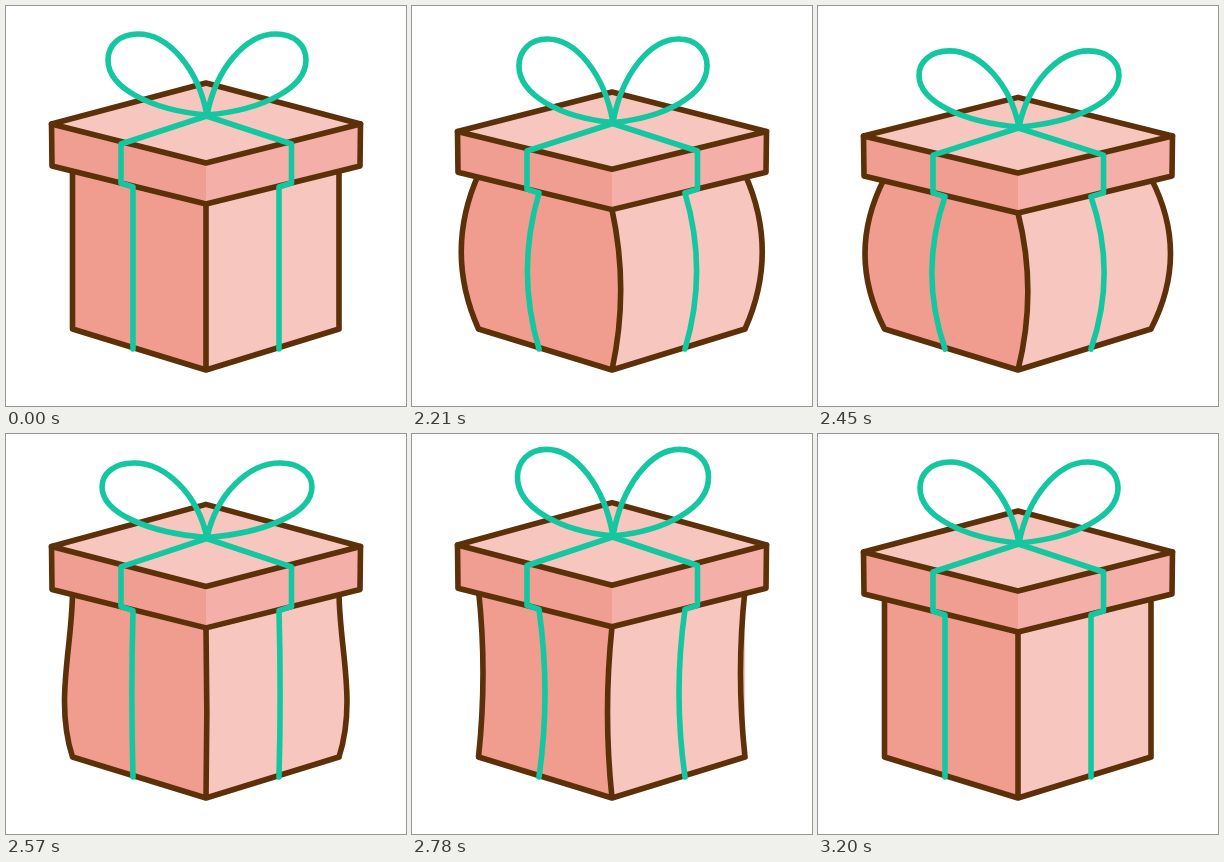
Recreate the animation shown at these times as an HTML page. Size 400 by 400 pixels, loop 3230 ms.

```html
<!DOCTYPE html>
<html>
<head>
<meta charset="utf-8">
<style>
  html, body { margin: 0; width: 100%; height: 100%; overflow: hidden; background: #fff; }
  svg { display: block; width: 100vw; height: 100vh; }
  .edge { stroke: #5c3008; }
  .ribbon { stroke: #15c7a0; fill: none; }
</style>
</head>
<body>
<svg viewBox="0 0 400 400" stroke-width="5.6" stroke-linejoin="round" stroke-linecap="round">
  <path id="bodyLeft" fill="#f09d8f"/>
  <path id="bodyRight" fill="#f7c6bf"/>
  <path id="bodyEdge" class="edge" fill="none"/>
  <path id="lidLeft" fill="#f09d92"/>
  <path id="lidRight" fill="#f4b0a8"/>
  <path id="lidEdge" class="edge" fill="none"/>
  <path id="lidTop" class="edge" fill="#f7c6bf"/>
  <path id="ribbons" class="ribbon"/>
  <path id="bow" class="ribbon"/>
</svg>
<script>
const LOOP = 3230, START = 2030, STEP = 30;

// time, lid drop, bow width, bow height, side bulge (upper, lower), inner bulge
const KEYS = [
  [2000, 0, 1, 1, 0, 0, 0],
  [2030, .7, .99, 1, 3, 3, 2],
  [2210, 7.5, .95, 1.03, 23, 23, 15.5],
  [2450, 12, 1.01, .94, 26, 26, 17.5],
  [2570, -5.5, 1.06, .92, 0, 18, 1.5],
  [2670, -19, 1, 1.07, -14, -8, -16],
  [2780, -7, .965, 1.07, -6, -6, -8],
  [2890, 5, .99, .99, 6, 5, 4],
  [3000, 2, 1.01, .98, 3, 3, 2],
  [3110, -1.5, 1, 1, -1, -1, -1],
  [3200, 0, 1, 1, 0, 0, 0],
  [3230, 0, 1, 1, 0, 0, 0]
];

const set = (id, d) => document.getElementById(id).setAttribute('d', d);

// Smooth spline through the keys
function pose(time) {
  if (time < START) return KEYS[0].slice(1);
  const t = START + Math.floor((time - START) / STEP) * STEP;
  let i = 0;
  while (i < KEYS.length - 2 && t >= KEYS[i + 1][0]) i++;
  const a = KEYS[i], b = KEYS[i + 1];
  const before = KEYS[i - 1] || a, after = KEYS[i + 2] || b;
  const span = b[0] - a[0], p = (t - a[0]) / span, q = 1 - p;
  return a.slice(1).map((v, k) => {
    const n = k + 1;
    const slopeA = (b[n] - before[n]) / (b[0] - before[0]) * span;
    const slopeB = (after[n] - a[n]) / (after[0] - a[0]) * span;
    return q * q * (1 + 2 * p) * v + p * p * (3 - 2 * p) * b[n] + p * q * (q * slopeA - p * slopeB);
  });
}

// Vertical edge bent sideways by its two control points
const bend = (x, top, bottom, upper, lower = upper) => {
  const third = (bottom - top) / 3;
  return `${x},${top} C${x + upper},${top + third} ${x + lower},${bottom - third} ${x},${bottom}`;
};

function draw(time) {
  const [drop, bowW, bowH, upper, lower, inner] = pose(time);
  const back = 77 + drop * 1.2, side = 118 + drop, front = 157 + drop * .83;
  const sideLow = 160 + drop * .83, frontLow = 198 + drop * .75;

  const leftEdge = bend(66.5, 162 + drop * .85, 323, -upper, -lower);
  const rightEdge = bend(333, 162 + drop * .85, 323, upper, lower);
  const midEdge = bend(200, frontLow, 364, inner * .75);
  set('bodyLeft', `M${leftEdge} L200,364 V${frontLow}Z`);
  set('bodyRight', `M${midEdge} L333,323 L${rightEdge} L333,${sideLow} L200,${frontLow}Z`);
  // Refill the left half up to the bent middle edge
  set('bodyLeft', `M${leftEdge} L200,364 V${frontLow}Z M${midEdge}Z`);
  set('bodyEdge', `M${leftEdge} L200,364 L333,323 M${rightEdge} M${midEdge}`);

  set('lidLeft', `M45.5,${side} L200,${front} V${frontLow} L46,${sideLow}Z`);
  set('lidRight', `M354.5,${side} L200,${front} V${frontLow} L354,${sideLow}Z`);
  set('lidEdge', `M45.5,${side} L46,${sideLow} L200,${frontLow} L354,${sideLow} L354.5,${side}`);
  set('lidTop', `M45.5,${side} L200,${back} L354.5,${side} L200,${front}Z`);

  const ribbon = (edge, fold, dir) =>
    `M200.5,${110 + drop} L${edge},${138 + drop * .93} V${177 + drop * .82} ` +
    `L${bend(fold, 181 + drop * .8, 343, dir * inner)}`;
  set('ribbons', ribbon(115, 127, -1) + ribbon(285.5, 273, 1));

  const at = (x, y) => `${201 + x * bowW},${109 + drop + y * bowH} `;
  const loop = s => 'M' + at(0, 0) +
    'C' + at(s * 9, -47) + at(s * 39, -81) + at(s * 69, -81) +
    'C' + at(s * 87, -81) + at(s * 99, -70) + at(s * 99, -55) +
    'C' + at(s * 99, -27) + at(s * 56, -5) + at(0, 0);
  set('bow', loop(-1) + loop(1));
}

const origin = performance.now();
function tick() {
  draw((performance.now() - origin) % LOOP);
  requestAnimationFrame(tick);
}
tick();
</script>
</body>
</html>
```
